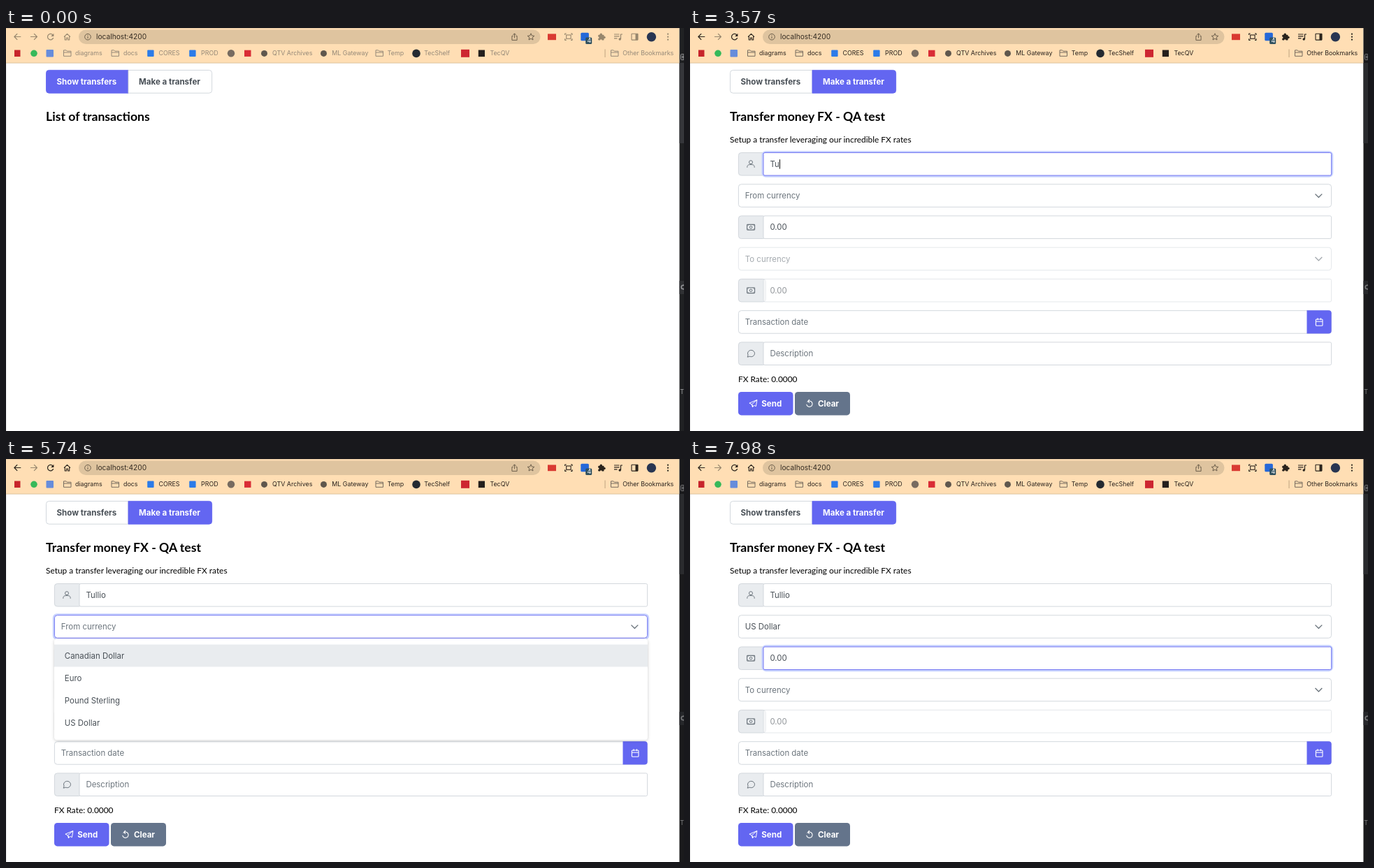
Write an HTML page that moves like this. It is 970 px wide and 577 px high and loops after 8000 ms.

```html
<!DOCTYPE html>
<html lang="en">
<head>
<meta charset="utf-8">
<title>Money transfer form</title>
<style>
  html, body { margin: 0; width: 100%; height: 100%; overflow: hidden; background: #fff; }
  svg { display: block; width: 970px; height: 577px; font: 11.45px Inter, sans-serif; white-space: pre; }
  .b { font-weight: 700; font-size: 11.55px; }
  .lato { font: 11.9px Lato, sans-serif; }
  .h { font: 700 17.65px Lato, sans-serif; }
  .bm { font-size: 8.9px; }
  .url { font-size: 10.2px; }
</style>
</head>
<body>
<svg id="stage" viewBox="0 0 970 577"></svg>
<script>
const LOOP = 8000, STEP = 70;
const stage = document.getElementById('stage');
const pen = document.createElement('canvas').getContext('2d');

const INDIGO = '#6366f1', DEEP = '#4f46e5', RING = '#c7d2fe', LINE = '#ced4da',
      INK = '#495057', HINT = '#6c757d', PALE = '#e9ecef';
const NAME = 'Tullio', KEY_TIMES = [3290, 3570, 3780, 3850, 3990, 4130];
const CURRENCIES = ['Canadian Dollar', 'Euro', 'Pound Sterling', 'US Dollar'];
const HOVER_TIMES = [5740, 5950, 6090, 6440];

// Eased progress of t from a to b
const ramp = (t, a, b) => {
  const p = Math.min(1, Math.max(0, (t - a) / (b - a)));
  return p * p * (3 - 2 * p);
};
const mix = (a, b, p) => '#' + [1, 3, 5].map(i => {
  const u = parseInt(a.substr(i, 2), 16), v = parseInt(b.substr(i, 2), 16);
  return Math.round(u + (v - u) * p).toString(16).padStart(2, '0');
}).join('');

const rect = (x, y, w, h, fill, r = 0, more = '') =>
  `<rect x="${x}" y="${y}" width="${w}" height="${h}" rx="${r}" fill="${fill}" ${more}/>`;
const circle = (x, y, r, fill, more = '') => `<circle cx="${x}" cy="${y}" r="${r}" fill="${fill}" ${more}/>`;
const text = (x, y, s, fill, cls = '') => `<text x="${x}" y="${y}" fill="${fill}" class="${cls}">${s}</text>`;
const line = (d, color, w = 1, more = '') =>
  `<path d="${d}" fill="none" stroke="${color}" stroke-width="${w}" stroke-linejoin="round" ${more}/>`;
const stroke = (color, w = 0.9) => `stroke="${color}" stroke-width="${w}"`;
const group = (opacity, body) => `<g opacity="${opacity}">${body}</g>`;

const folder = (x, color) =>
  line(`M${x + .5} 40.3V31.8h3.6l1.3 1.4h5.6v7.1zM${x + .5} 35h10.5`, color, 1);

function toolbar(t) {
  const awake = ramp(t, 1050, 1260);
  const ink = mix('#96866d', '#29231c', awake), label = mix('#948978', '#28231d', awake);
  const mid = '#6d5f4b', dir = mix('#948978', '#756c5f', awake);
  let s = rect(0, 0, 963.5, 50, '#ffdeb4') + rect(0, 49.6, 963.5, .9, '#d9bd98')
    + rect(0, 0, 963.5, .7, '#dcc29f')
    + rect(104, 2.5, 660.5, 20.5, '#dfc49f', 10.2);

  // Navigation
  s += line('M21.3 12.5H12M16.2 8.2l-4.3 4.3 4.3 4.3', ink, 1.2)
    + line('M35 12.5h9.3M40.1 8.2l4.3 4.3-4.3 4.3', '#96866d', 1.2)
    + line('M67 10A4.2 4.2 0 1 0 67.7 14', ink, 1.2)
    + `<path d="M68.4 7.8v4.2h-4.2z" fill="${ink}"/>`
    + line('M83 12.6l4.5-4.3 4.5 4.3M84.3 11.8v5.2h2.2v-3h2v3h2.2v-5.2', ink, 1.1)
    + circle(117, 12.7, 4.3, 'none', stroke(mid, 1))
    + line('M117 12v3M117 10v1.1', mid, 1)
    + text(129, 16.4, 'localhost:4200', '#352c22', 'url');

  // Right side buttons
  s += line('M725.6 11.4h-1.7v6h7.2v-6h-1.7M727.5 14.3V8M725.3 10l2.2-2.2 2.2 2.2', mid, 1)
    + line('M751 7.8l1.4 3.2 3.5.3-2.7 2.3.8 3.4-3-1.8-3 1.8.8-3.4-2.7-2.3 3.5-.3z', mid, 1)
    + rect(775, 8.4, 12, 8.8, '#d93a32')
    + line('M799.7 10V8h2M808 8h2v2M810 15.3v2h-2M801.700 17.3h-2v-2', ink, 1.2)
    + rect(801.7, 10, 6.4, 5.3, 'none', 0, stroke(ink, 1.1))
    + rect(822.3, 6.8, 11.6, 11.4, '#2568d8', 1.5)
    + rect(829.2, 13.6, 9, 9.3, '#31515f', 1.5) + text(831.4, 21, '4', '#fff', 'bm')
    + rect(847.2, 9.8, 8.4, 7.8, ink, 1) + circle(851.3, 9.3, 1.7, ink) + circle(856, 13.4, 1.7, ink)
    + circle(847.3, 13.7, 1.2, '#ffdeb4') + circle(851.3, 17.5, 1.2, '#ffdeb4')
    + line('M870 9h7.500M870 11.900h7.500M870 14.800h4.500M879.500 16V9h2.500', ink, 1.2)
    + circle(878.2, 16, 1.7, ink)
    + rect(895, 8.3, 9, 8.8, 'none', .5, stroke(ink, 1.1)) + rect(900.5, 8.3, 3.5, 8.8, ink)
    + circle(923.4, 12.7, 6.7, '#283552')
    + [8.7, 12.7, 16.7].map(y => circle(947, y, 1.1, ink)).join('');

  // Bookmarks
  s += rect(12, 31.5, 8.5, 9.5, '#c7242b') + circle(40, 36.3, 4.8, '#36b95a')
    + rect(57.5, 31, 10.5, 10.5, '#668cdb', 1)
    + rect(202.2, 31.5, 9.4, 9.4, '#2c7be8', 1) + rect(262.2, 31.5, 9.4, 9.4, '#2c7be8', 1)
    + circle(322, 36.3, 5.2, '#776b60') + rect(341, 31.7, 9.5, 9.2, '#d92c35')
    + circle(369.5, 36.4, 4.5, '#5f574d') + circle(454.5, 36.4, 4.5, '#5f574d')
    + circle(587, 36.4, 5.8, '#242a31') + rect(651, 30.8, 12, 11, '#cd2631')
    + rect(675.8, 31.5, 9.2, 9.6, '#241f1c')
    + [82, 150.5, 528.5, 865].map(x => folder(x, dir)).join('')
    + rect(856.6, 30.5, .9, 11.5, '#b79d7c');
  const labels = { 99: 'diagrams', 168: 'docs', 218.5: 'CORES', 279: 'PROD', 381: 'QTV Archives',
    466.3: 'ML Gateway', 545.7: 'Temp', 598.3: 'TecShelf', 692.4: 'TecQV', 882.2: 'Other Bookmarks' };
  for (const x in labels) s += text(x, 39.4, labels[x], label, 'bm');
  return s;
}

function sideStrip(t) {
  return rect(963.5, 0, 6.5, 577, '#202123') + rect(963.5, 50, 6.5, 115, '#35363a')
    + rect(965.5, 37.5, 4.5, 8, 'none', 1, stroke('#9a9a9c', 1)) + rect(967, 39.5, 3, 4, '#77787a')
    + rect(963.5, 362, 6.5, 19, '#303134')
    + circle(969, 371, 2.8, 'none', stroke('#97989b', 1.5))
    + text(964.3, 523.5, 'T', '#a3a4a6', 'bm')
    + rect(963.5, 0, 6.5, 577, '#000', 0, `opacity="${.2 * ramp(t, 1050, 1260)}"`);
}

function tabs(t) {
  const sel = ramp(t, 1740, 1950), lab = ramp(t, 1860, 2160);
  const hover = ramp(t, 1600, 1740) * (1 - ramp(t, 2240, 2400));
  const ring = ramp(t, 1740, 1880) - ramp(t, 2510, 2730);
  const left = mix(INDIGO, '#ffffff', sel);
  const right = mix(mix('#ffffff', PALE, hover), mix(INDIGO, DEEP, hover), sel);
  return `<path d="M175 60.400H61.500a4 4 0 0 0-4 4v24.800a4 4 0 0 0 4 4H175z" fill="${left}" ${stroke(mix(INDIGO, LINE, sel))}/>`
    + `<path d="M175 60.400h115.600a4 4 0 0 1 4 4v24.800a4 4 0 0 1-4 4H175z" fill="${right}" ${stroke(mix(LINE, right, sel))}/>`
    + rect(173, 58.4, 123.8, 36.9, 'none', 5.5, stroke('#a5aff5', 1.6) + ` opacity="${ring}"`)
    + rect(174.4, 59.8, 121, 34.100, 'none', 4.5, stroke('#ffffff', 1) + ` opacity="${ring}"`)
    + text(72.5, 81, 'Show transfers', mix('#ffffff', INK, lab), 'b')
    + text(190, 81, 'Make a transfer', mix(INK, '#ffffff', lab), 'b');
}

const icons = {
  user: y => circle(87, y - 2.6, 2.5, 'none', stroke(HINT, 1)) + line(`M81.800 ${y + 5}c0-4 2-4.200 5.200-4.200s5.200.200 5.200 4.200`, HINT, 1),
  money: y => rect(81.6, y - 3.9, 11, 7.8, 'none', .8, stroke(HINT, 1.1)) + circle(87.1, y, 1.8, 'none', stroke(HINT, 1))
    + line(`M82 ${y - 1.6}l2-2M92.200 ${y - 1.6}l-2-2M82 ${y + 1.6}l2 2M92.200 ${y + 1.6}l-2 2`, HINT, .8),
  chat: y => line(`M82.200 ${y + 5}l.900-3a5 4.700 0 1 1 2.200 2z`, HINT, 1),
};

// One form row; "active" tints the border, "ring" shows the focus glow
function field(row, { icon, value, color = HINT, active = 0, ring = 0, dim = 1, chevron, caret }) {
  const y = 178.5 + row * 45.23, mid = y + 16.3, x = icon ? 105 : 69.4;
  const box = rect(x, y, 917.6 - x, 32.6, '#fff', icon ? 2 : 4, stroke(mix(LINE, INDIGO, active)));
  let s = icon ? rect(69.4, y, 39, 32.6, PALE, 4, stroke(LINE)) + icons[icon](mid) : '';
  s += rect(x - 1.4, y - 1.4, 917.6 - x + 2.8, 35.4, '#fff', 5, stroke(RING, 2.4) + ` opacity="${ring}"`);
  let inner = box + text(x + 9.4, mid + 4.2, value, color);
  if (chevron) inner += line(`M894.500 ${mid - 2.4}l4.900 4.900 4.900-4.900`, HINT, 1.4);
  if (caret) inner += rect(x + 9.4 + caret, mid - 6.6, 1, 13.4, '#111');
  return s + group(dim, inner);
}

function form(t) {
  pen.font = '11.45px Inter, sans-serif';
  const typed = NAME.slice(0, KEY_TIMES.filter(k => t >= k).length);
  const chosen = t >= 6650;
  const blur = ramp(t, 7480, 7640), toFrom = ramp(t, 4330, 4550);
  const dip = .7 * (ramp(t, 6640, 6760) - ramp(t, 6790, 6930));
  const recRing = ramp(t, 2500, 2730) - toFrom;
  const recHover = ramp(t, 2430, 2590) - ramp(t, 4800, 5040);
  const recCaret = (t >= 2520 && t < 3080) || (t >= 3290 && t < 4340);

  let s = text(57, 164, 'Setup a transfer leveraging our incredible FX rates', '#000', 'lato');
  s += field(0, { icon: 'user', value: typed || 'Recipient', color: typed ? INK : HINT,
    active: Math.max(recHover, recRing), ring: recRing, caret: recCaret && pen.measureText(typed).width + .3 });
  s += field(1, { value: chosen ? CURRENCIES[3] : 'From currency', color: chosen ? INK : HINT,
    active: toFrom - blur, ring: Math.max(0, toFrom - dip - blur), chevron: true });
  s += field(2, { icon: 'money', value: '0.00', color: INK, active: ramp(t, 7170, 7320), ring: blur,
    caret: t >= 7490 && t < 7980 && pen.measureText('0.00').width + .3 });
  s += field(3, { value: 'To currency', dim: chosen ? 1 : .6, chevron: true });
  s += field(4, { icon: 'money', value: '0.00', color: INK, dim: .6 });
  s += field(5, { value: 'Transaction date' });
  s += field(6, { icon: 'chat', value: 'Description' });

  // Date button
  s += `<path d="M882.500 404.200h31.200a4 4 0 0 1 4 4v25.300a4 4 0 0 1-4 4h-31.200z" fill="${INDIGO}"/>`
    + rect(895.4, 417, 9.6, 9.2, 'none', 1, stroke('#fff', 1.1))
    + line('M895.400 420.300h9.600M898 415.300v3M902.400 415.300v3', '#fff', 1.1);

  s += text(69, 506.6, 'FX Rate: 0.0000', '#000', 'lato')
    + rect(69, 521, 78.5, 33.4, INDIGO, 4.4) + rect(150, 521, 79, 33.4, '#64748b', 4.4)
    + line('M95.900 532.400l-11 4.700 3.400 1.800 1.200 4 1.900-2.600 3 1.300zM88.300 538.900l7.600-6.500M89.500 542.900v-3.300', '#fff', 1)
    + line('M167.600 535.500a4.200 4.200 0 1 1-.900 3.200M170.900 532l-2.200 2.300 2.200 2.200', '#fff', 1.1)
    + text(102.3, 542, 'Send', '#fff', 'b') + text(183, 542, 'Clear', '#fff', 'b');
  return s + menu(t);
}

function menu(t) {
  const open = ramp(t, 5140, 5360), shown = open - ramp(t, 6710, 6870);
  if (shown <= 0) return '';
  const hot = HOVER_TIMES.filter(k => t >= k).length - 1;
  const top = 257.3, grow = .8 + .2 * open;
  let s = rect(69, top, 849, 145, '#fff', 4, 'style="filter:drop-shadow(0 1px 2px #0003)"');
  CURRENCIES.forEach((name, i) => {
    const y = 265.6 + i * 31.9, picked = t >= 6650 && i === 3;
    if (i === hot) s += rect(69, y, 849, 31.9, picked ? '#eef2ff' : PALE);
    s += text(83.8, y + 20.2, name, picked ? '#4338ca' : INK);
  });
  return `<g opacity="${shown}" transform="translate(0 ${top * (1 - grow)}) scale(1 ${grow})">${s}</g>`;
}

function render(t) {
  const onForm = t >= 1750;
  stage.innerHTML = rect(0, 0, 970, 577, '#fff') + rect(0, 50, .7, 527, '#e3e3e3')
    + toolbar(t) + sideStrip(t) + tabs(t)
    + text(57, 132.8, onForm ? 'Transfer money FX - QA test' : 'List of transactions', '#000', 'h')
    + (onForm ? form(t) : '');
}

let last = -1;
function tick() {
  const t = Math.floor(performance.now() % LOOP / STEP) * STEP;
  if (t !== last) render(last = t);
  requestAnimationFrame(tick);
}
tick();
</script>
</body>
</html>
```
